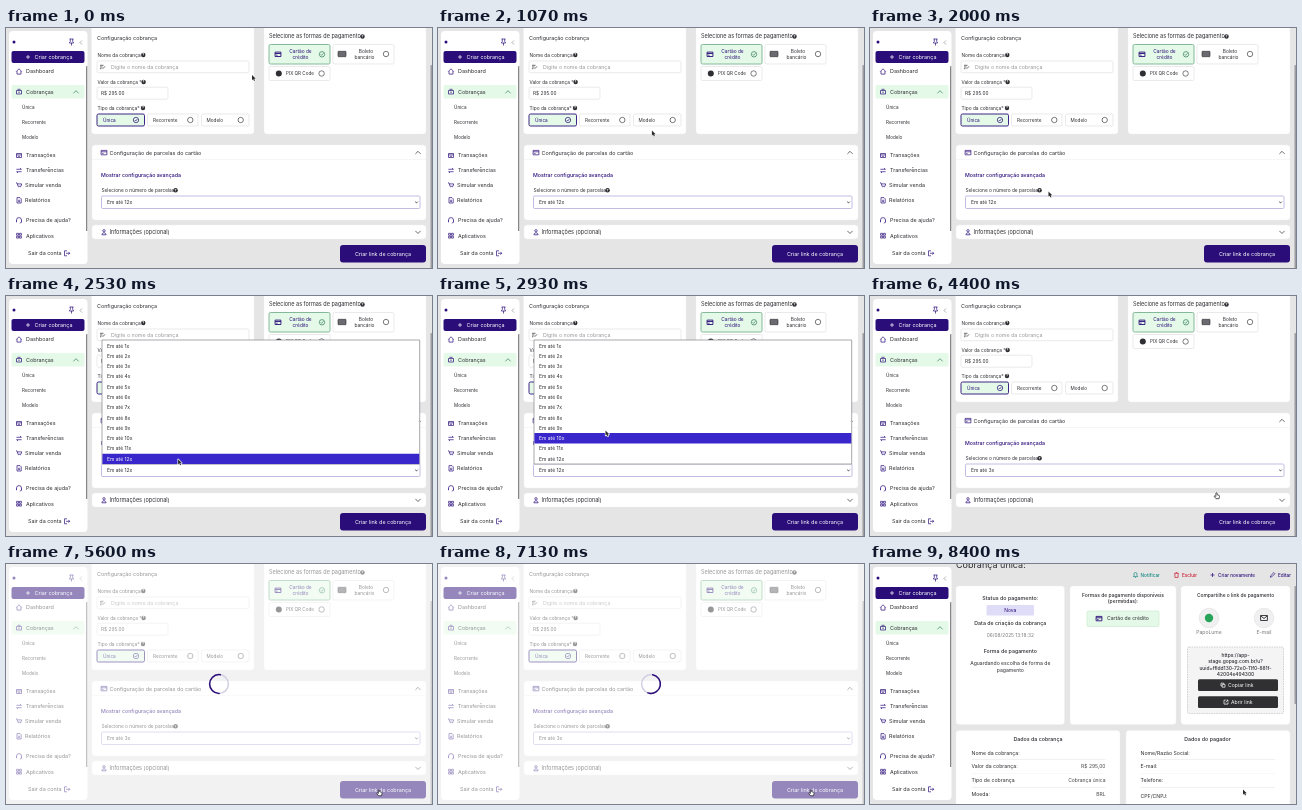
Write an HTML page with a canvas that moves like this. It is 426 by 240 pixels and loops after 8.79 s.

```html
<!DOCTYPE html>
<html lang="pt-BR">
<head>
<meta charset="utf-8">
<style>
html, body { margin: 0; width: 100%; height: 100%; overflow: hidden; background: #e5e5e6 }
canvas { display: block; width: 426px; height: 240px }
</style>
</head>
<body>
<canvas id="stage"></canvas>
<script>
const canvas = document.getElementById('stage'), c = canvas.getContext('2d');
const dpr = window.devicePixelRatio || 1;
canvas.width = 426 * dpr;
canvas.height = 240 * dpr;

const LOOP = 8790, OPEN = 2400, CLOSE = 3850, HAND = 4330, LOADING = 5200, DONE = 7670;
const INK = '#2c2c32', INDIGO = '#2a0d79', GREY = '#77777c', LINE = '#dcdce0';
const GREEN = '#2f7d58', SAGE = '#76b08f', MINT = '#e5f9e8';

// time, x, y, and whether the move to this point is eased
const track = [
  [0, 246, 47], [200, 246, 47], [2000, 178.5, 163.5, 1], [2250, 174, 171], [2450, 173, 169],
  [2930, 167.5, 134.5], [3530, 154.5, 75], [3680, 153, 70], [CLOSE, 153, 70],
  [4400, 346.5, 196.5, 1], [4750, 373, 225.5, 1], [LOOP, 373, 225.5]
];

const icons = {
  up: 'M-2.6 1.3L0-1.3L2.6 1.3',
  down: 'M-2.6-1.3L0 1.3L2.6-1.3',
  left: 'M1-2L-1 0L1 2',
  plus: 'M-2 0H2M0-2V2',
  pin: 'M-2-3H2M-1.2-3V-.5L-2.2 1H2.2L1.2-.5V-3M0 1V3.5',
  home: 'M-2.7 0L0-2.7L2.7 0M-2-.5V2.6H2V-.5',
  coins: 'M-2.5-1.5H2.5V2H-2.5ZM-1.5-2.7H1.5M-.8.2H.8',
  list: 'M-2.5-2H2.5V2H-2.5ZM-2.5-.6H2.5M-1.2 .8H1',
  swap: 'M-2.6-1.2H2.4L1-2.5M2.6 1.2H-2.4L-1 2.5',
  cart: 'M-3-2.4H-2L-1 1H2L2.7-1.4H-1.6M-.7 2.4H-.5M1.6 2.4H1.8',
  report: 'M-2-2.7H1L2.2-1.5V2.7H-2ZM-.9 0H1M-.9 1.3H1',
  help: 'M-2.5 1V-.4A2.5 2.5 0 0 1 2.5-.4V1M-2.5 0V1.8M2.5 0V1.8L.8 2.6',
  grid: 'M-2.4-2.4H-.5V-.5H-2.4ZM.5-2.4H2.4V-.5H.5ZM-2.4.5H-.5V2.4H-2.4ZM.5.5H2.4V2.4H.5Z',
  exit: 'M0-2.5H-2.5V2.5H0M-1 0H2.7M1.4-1.4L2.8 0L1.4 1.4',
  card: 'M-2.9-2.2H2.9V2.2H-2.9ZM-2.9-.8H2.9M-1.8 .9H-.5',
  edit: 'M-2.5-1.7H1M-2.5 0H0M-2.5 1.7H-1M.2 1.8L2.6-.7',
  user: 'M-2.1 2.6C-2.1 0 2.1 0 2.1 2.6ZM-1.2-1.4A1.2 1.2 0 1 1 1.2-1.4A1.2 1.2 0 1 1-1.2-1.4',
  tick: 'M-1.3 0L-.3 1L1.4-1',
  mail: 'M-3.4-2.5H3.4V2.5H-3.4ZM-3.4-2.2L0 .5L3.4-2.2',
  bell: 'M-2.2 1.6H2.2L1.5.6V-1A1.5 1.5 0 0 0-1.5-1V.6ZM-.5 2.4H.5',
  bin: 'M-2.2-1.7H2.2M-1.6-1.7V2.4H1.6V-1.7M-.7-2.5H.7',
  pencil: 'M-2.2 2.2L-1.8.7L1.3-2.4L2.4-1.3L-.7 1.8Z',
  copy: 'M-.8-.8H2V2H-.8ZM-.8 .8H-2V-2H.8V-.8',
  link: 'M-.2-2H-2V2H2V.2M.5-2H2V-.5M2-2L-.3.3'
};
for (const key in icons) icons[key] = new Path2D(icons[key]);
const arrow = new Path2D('M0 0V5.2L1.2 4.1L2 6L3 5.6L2.2 3.8H3.8Z');
const hand = new Path2D('M-.6 3V.6Q0-.3.6.6V2.2L2.6 2.8Q3.2 3.1 3 4L2.5 6.2H-.6L-2.2 4Q-2.2 3-1.4 3.3L-.6 4Z');

function text(s, x, y, size = 5, color = INK, align = 'left', weight = 400) {
  c.font = `${weight} ${size}px Inter, "Open Sans", sans-serif`;
  c.textAlign = align;
  c.fillStyle = color;
  c.fillText(s, x, y + size * .36);
}
const mid = (s, x, y, size, color, weight) => text(s, x, y, size, color, 'center', weight);

function box(x, y, x2, y2, fill, stroke, r = 1.5, width = .6) {
  c.beginPath();
  c.roundRect(x, y, x2 - x, y2 - y, r);
  if (fill) { c.fillStyle = fill; c.fill(); }
  if (stroke) { c.strokeStyle = stroke; c.lineWidth = width; c.stroke(); }
}
const panel = (x, y, x2, y2) => box(x, y, x2, y2, '#fff', '#ececee', 3, .4);

function disc(x, y, r, fill, stroke) {
  c.beginPath();
  c.arc(x, y, r, 0, 7);
  if (fill) { c.fillStyle = fill; c.fill(); }
  if (stroke) { c.strokeStyle = stroke; c.lineWidth = .7; c.stroke(); }
}

function icon(name, x, y, color = INK, width = .7) {
  c.save();
  c.translate(x, y);
  c.strokeStyle = color;
  c.lineWidth = width;
  c.stroke(icons[name]);
  c.restore();
}

function hint(x, y) {
  disc(x, y, 2.2, INK);
  mid('?', x, y, 3.6, '#fff', 700);
}

function option(x, y, x2, y2, accent) {
  box(x, y, x2, y2, accent ? MINT : '#fff', accent || LINE, 1.5, accent ? .9 : .6);
}
function radio(x, y, accent) {
  disc(x, y, 2.7, null, accent || '#44444a');
  if (accent) icon('tick', x, y, accent);
}

function sidebar() {
  box(3, 3, 81.5, 236, '#fff', null, 4);
  box(80, 38, 81.3, 203, '#85858a', null, .6);
  disc(8, 14, 1.5, INDIGO);
  icon('pin', 65.5, 14, INDIGO);
  icon('left', 75, 14.5, GREY, .6);
  box(5.5, 23, 78.5, 35, INDIGO, null, 2);
  icon('plus', 22, 29, '#fff', .7);
  text('Criar cobrança', 28.5, 29, 5.4, '#fff');
  box(5.5, 57, 78.5, 70.5, MINT);
  icon('up', 70, 64, GREEN);
  [['home', 'Dashboard', 43.5], ['coins', 'Cobranças', 64], ['list', 'Transações', 127.5],
   ['swap', 'Transferências', 142.5], ['cart', 'Simular venda', 157.3, 19], ['report', 'Relatórios', 172.3, 19],
   ['help', 'Precisa de ajuda?', 192.5], ['grid', 'Aplicativos', 207.7]
  ].forEach(([name, label, y, x = 20]) => {
    icon(name, 13, y, INDIGO);
    text(label, x, y, 5.4);
  });
  ['Única', 'Recorrente', 'Modelo'].forEach((s, i) => text(s, 16, 79.3 + 15.1 * i, 4.6));
  text('Sair da conta', 22, 225.3, 5.4);
  icon('exit', 61, 225.3, INDIGO);
}

function form(t) {
  panel(85.5, -5, 248, 106);
  text('Configuração cobrança', 91, 10.5, 5.4);
  text('Nome da cobrança', 91.5, 27, 4.8);
  hint(137.3, 27);
  box(91, 33, 243, 44.7, '#fff', LINE);
  icon('edit', 96.5, 39);
  text('Digite o nome da cobrança', 105, 39, 5.3, '#98989d');
  text('Valor da cobrança *', 91.5, 54, 4.7);
  hint(137.6, 54);
  box(91, 59.2, 162, 71.2, '#fff', LINE);
  text('R$ 295.00', 95, 65.3, 4.8);
  text('Tipo da cobrança*', 91.5, 80, 4.8);
  hint(137, 80);
  [['Única', 91, 138.5, 97, 130], ['Recorrente', 141.5, 192, 147, 184.3], ['Modelo', 195.5, 243, 200.5, 234.7]]
    .forEach(([label, x, x2, tx, rx], i) => {
      const accent = i ? null : INDIGO;
      option(x, 86, x2, 98, accent);
      text(label, tx, 92, 4.7, accent || INK);
      radio(rx, 92, accent);
    });

  panel(258, -5, 420, 106);
  text('Selecione as formas de pagamento', 263, 8.5, 5.5);
  hint(356.5, 8.5);
  option(263, 16.5, 324, 36, SAGE);
  icon('card', 272, 26.3, INDIGO, .9);
  mid('Cartão de', 294.5, 23, 4.8, INDIGO);
  mid('crédito', 294.5, 29.4, 4.8, INDIGO);
  radio(316, 26.3, GREEN);
  option(327, 16.5, 388, 36);
  box(332, 23.3, 340, 28.7, '#6a6a70', INK, .5);
  mid('Boleto', 360, 22.8, 4.8);
  mid('bancário', 358.5, 29.2, 4.8);
  radio(380, 26);
  option(263, 38.5, 324, 52.5);
  disc(272.8, 45.5, 3, '#2e2e33');
  text('PIX QR Code', 280, 45.5, 4.6);
  radio(315.6, 45.5);

  panel(86, 117, 420, 192);
  box(86, 131.5, 420, 132, '#ededf0', null, 0);
  icon('card', 98, 124.6, INDIGO);
  text('Configuração de parcelas do cartão', 103.6, 124.6, 5.4);
  icon('up', 412, 124.6);
  text('Mostrar configuração avançada', 95, 147.6, 5.25, INDIGO, 'left', 500);
  text('Selecione o número de parcelas', 95.5, 162.3, 4.8);
  hint(169.6, 162.3);
  box(95.5, 168, 414, 180.5, '#fff', '#b3add9', 1.2, .8);
  text(t < CLOSE ? 'Em até 12x' : 'Em até 3x', 101, 174.3, 5);
  c.save();
  c.translate(410.5, 174.3);
  c.scale(.5, .5);
  c.strokeStyle = INK;
  c.lineWidth = 1.7;
  c.stroke(icons.down);
  c.restore();

  panel(86, 197, 420, 211);
  icon('user', 98, 204.2, INDIGO);
  text('Informações (opcional)', 103.5, 204.2, 5.5);
  icon('down', 412, 204.2);
  box(334, 217, 420, 234.5, INDIGO, null, 3);
  mid('Criar link de cobrança', 377, 225.8, 5.4, '#fff');
  box(424.6, 37, 425.8, 243, '#8c8c91', null, .6);
}

function dropdown(t) {
  const pitch = 10.28, top = 44.6;
  const hover = Math.min(11, Math.floor((cursorAt(t - 70)[1] - top) / pitch));
  box(96, 44, 413.7, 168, '#fff', '#85858c', 0, .7);
  for (let i = 0; i < 12; i++) {
    const y = top + pitch * i, on = i === hover;
    if (on) box(96.4, y, 413.3, y + pitch, '#3a27cb', null, 0);
    text(`Em até ${i + 1}x`, 101, y + pitch / 2, 5, on ? '#fff' : INK);
  }
}

function loader(t) {
  c.globalAlpha = Math.min(1, (t - LOADING) / 150);
  box(0, 0, 426, 240, 'rgba(255,255,255,.5)', null, 0);
  const turn = (t - 7130) / 1000 * 2 * Math.PI;
  c.lineWidth = 1.5;
  c.lineCap = 'round';
  [['#d3cfe4', 0, 7], [INDIGO, turn - 1.4, turn + 1.9]].forEach(([color, from, to]) => {
    c.beginPath();
    c.arc(213, 120, 9.4, from, to);
    c.strokeStyle = color;
    c.stroke();
  });
  c.lineCap = 'butt';
  c.globalAlpha = 1;
}

function rows(x, x2, list) {
  list.forEach(([label, y, value], i) => {
    text(label, x, y, 5.2);
    if (value) text(value, x2, y, 5, '#444', 'right');
    if (i < list.length - 1) box(x, y + 6.8, x2, y + 7.2, '#e3e3e6', null, 0);
  });
}

function summary() {
  text('Cobrança única:', 86, .5, 9);
  [['bell', 'Notificar', 265.5, 270.5, '#12877f'], ['bin', 'Excluir', 306.5, 312, '#c9182b'],
   ['plus', 'Criar novamente', 342.5, 348, INDIGO], ['pencil', 'Editar', 402.5, 408, INDIGO]
  ].forEach(([name, label, ix, x, color]) => {
    icon(name, ix, 11, color);
    text(label, x, 11, 4.7, color, 'left', 500);
  });

  panel(86, 22, 194.5, 160.5);
  mid('Status do pagamento:', 140.3, 33.6, 5.35, INK, 500);
  box(116.5, 41, 164, 51.5, '#dedcf7', null, 1);
  mid('Nova', 140.3, 46.3, 5, INDIGO);
  mid('Data de criação da cobrança', 140.3, 59.2, 5.25, INK, 500);
  mid('06/08/2025 13:18:32', 140.3, 71, 4.8, GREY);
  mid('Forma de pagamento', 140.3, 87.6, 5.25, INK, 500);
  mid('Aguardando escolha de forma de', 140.3, 99.3, 5.1);
  mid('pagamento', 140.3, 106.6, 5.1);

  panel(200, 22, 306, 160.5);
  mid('Formas de pagamento disponíveis', 253, 30.8, 5, INK, 500);
  mid('(permitidas):', 253, 37, 5, INK, 500);
  box(217, 47, 289, 62.5, MINT, '#c4e8cc');
  icon('card', 229, 54.6, INDIGO, .9);
  text('Cartão de crédito', 237, 54.6, 5.1);

  panel(311, 22, 420, 160.5);
  mid('Compartilhe o link de pagamento', 365.5, 30.8, 4.9, INK, 500);
  disc(339, 54, 9.8, '#f0f0f1', '#e2e2e4');
  disc(339, 54, 4.2, '#27a35a');
  disc(394, 54, 9.8, '#f0f0f1', '#e2e2e4');
  icon('mail', 394, 54, INK, .9);
  mid('PapoLume', 339, 67.8, 5.1, GREY);
  mid('E-mail', 394, 67.8, 5.1, GREY);
  c.setLineDash([1.5, 1]);
  box(317.5, 83, 413.5, 149.5, '#f4f4f5', '#b5b5ba', 1.5);
  c.setLineDash([]);
  ['https://app-', 'stage.gopag.com.br/u?', 'uuid=ffldd130-72e0-11f0-881f-', '42004e494300']
    .forEach((s, i) => mid(s, 365.5, 91.6 + 6.1 * i, 4.9, INK, 500));
  box(328, 115.3, 408, 127, '#303033');
  icon('copy', 353, 121.2, '#fff');
  text('Copiar link', 358, 121.2, 5.1, '#fff');
  box(328, 132.3, 408, 144, '#303033');
  icon('link', 356, 138.1, '#fff');
  text('Abrir link', 361, 138.1, 5.1, '#fff');

  panel(86, 166.5, 250, 246);
  mid('Dados da cobrança', 168, 175.5, 5.3, INK, 500);
  rows(101.5, 235.5, [['Nome da cobrança:', 188.7], ['Valor da cobrança:', 202.4, 'R$ 295,00'],
    ['Tipo de cobrança', 216.2, 'Cobrança única'], ['Moeda:', 230, 'BRL']]);
  panel(256, 166.5, 420, 246);
  mid('Dados do pagador', 337.5, 175.5, 5.3, INK, 500);
  rows(270.5, 405, [['Nome/Razão Social:', 188.7], ['E-mail:', 202.4], ['Telefone:', 216.2], ['CPF/CNPJ:', 232.2]]);
  box(424.6, 22, 425.8, 140, '#8c8c91', null, .6);
}

function cursorAt(t) {
  const i = track.findIndex(k => k[0] > t), [t0, x0, y0] = track[i - 1], [t1, x1, y1, eased] = track[i];
  let p = (t - t0) / (t1 - t0);
  if (eased) p = p * p * (3 - 2 * p);
  return [x0 + (x1 - x0) * p, y0 + (y1 - y0) * p];
}

function pointer(t) {
  const pointing = t > HAND && t < DONE, shape = pointing ? hand : arrow;
  c.save();
  c.translate(...cursorAt(t));
  c.lineJoin = 'round';
  c.strokeStyle = pointing ? '#17171a' : '#fff';
  c.lineWidth = pointing ? .7 : 1.2;
  c.fillStyle = pointing ? '#fff' : '#2a2a2e';
  if (pointing) c.fill(shape);
  c.stroke(shape);
  if (!pointing) c.fill(shape);
  c.restore();
}

function draw(now) {
  const t = now % LOOP;
  c.setTransform(dpr, 0, 0, dpr, 0, 0);
  box(0, 0, 426, 240, '#e5e5e6', null, 0);
  sidebar();
  if (t < DONE) form(t); else summary();
  if (t >= OPEN && t < CLOSE) dropdown(t);
  if (t >= LOADING && t < DONE) loader(t);
  pointer(t);
  requestAnimationFrame(draw);
}
draw(performance.now());
</script>
</body>
</html>
```
